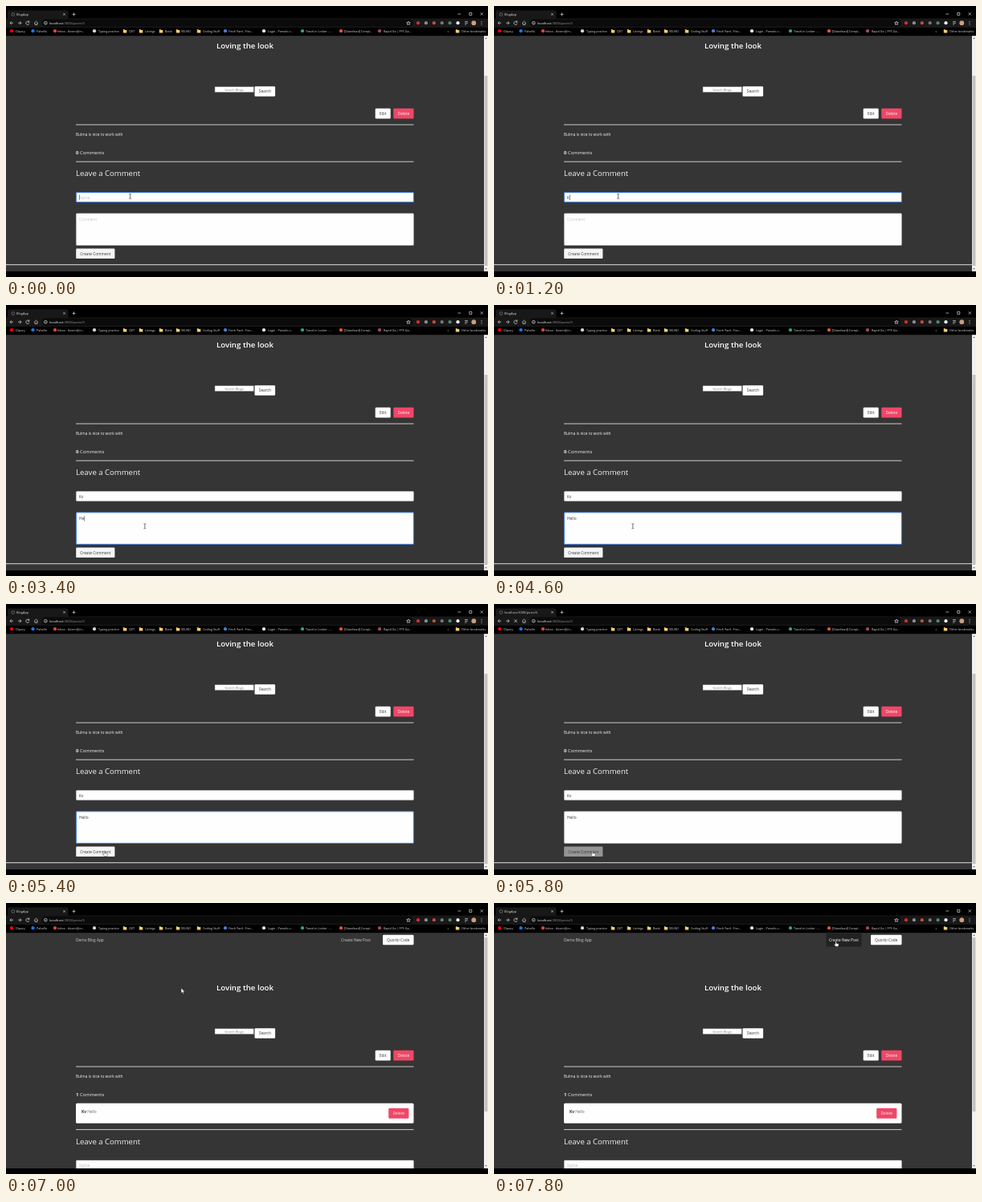
An HTML page that plays this animation: 600 by 338 pixels, repeating every 8 s.

```html
<!DOCTYPE html>
<html lang="en">
<head>
<meta charset="utf-8">
<title>Blog comment</title>
<style>
html, body { margin: 0; width: 100%; height: 100%; overflow: hidden; background: #000; }
svg { display: block; width: 100vw; height: 100vh; }
text { font: 4.8px "Open Sans", "Noto Sans", sans-serif; fill: #363636; white-space: pre; }
.mid { text-anchor: middle; }
.light { fill: #f2f2f2; }
.nav { fill: #cfcfcf; }
.hint { fill: #c4c4c4; }
.title { font-size: 9.7px; font-weight: 600; fill: #fff; }
.subtitle { font-size: 9.55px; fill: #f2f2f2; }
.count { font-size: 5.95px; fill: #f2f2f2; }
.bold { font-weight: 700; }
.small { font-size: 4px; fill: #858585; }
.chrome text { font-size: 3.7px; fill: #d8d8d8; }
.chrome .url { font-size: 4.15px; fill: #999; }
.chrome .tab { font-size: 3.9px; }
.rule { fill: #dcdcdc; }
.field { fill: #fefefe; stroke: #dbdbdb; stroke-width: .4; }
.focus { fill: none; stroke: #3273dc; stroke-width: .9; }
.pink { fill: #f14668; }
.icon { fill: none; stroke: #ddd; stroke-width: .7; }
.caret { fill: #222; }
</style>
</head>
<body>
<svg viewBox="0 0 600 338" preserveAspectRatio="none">
  <rect width="600" height="338" fill="#000"/>
  <rect y="37" width="600" height="294" fill="#353535"/>

  <g id="post">
    <text class="nav" x="87" y="47.8">Demo Blog App</text>
    <rect data-on="7800-8000" x="413.5" y="38" width="44" height="16.5" fill="#222"/>
    <text id="newPost" class="nav" x="417" y="47.8">Create New Post</text>
    <rect x="469" y="39.7" width="38.5" height="12.6" rx="1.2" fill="#fefefe"/>
    <text class="mid" x="488.2" y="47.8">Quorbi Code</text>
    <text class="title mid" x="297.5" y="109.4">Loving the look</text>
    <rect x="260" y="156.8" width="48.3" height="6.8" fill="#fff" stroke="#777" stroke-width=".5"/>
    <text class="small mid" x="284" y="161.7">Search Blogs</text>
    <rect x="309.5" y="156.3" width="25.6" height="12.5" rx="1.2" fill="#fefefe"/>
    <text class="mid" x="322.3" y="164.3">Search</text>
    <rect x="459.7" y="183.8" width="19" height="12.6" rx="1.2" fill="#fefefe"/>
    <text class="mid" x="469.2" y="191.8">Edit</text>
    <rect class="pink" x="482.3" y="183.8" width="25.2" height="12.6" rx="1.2"/>
    <text class="light mid" x="494.9" y="191.8">Delete</text>
    <rect class="rule" x="87" y="203.6" width="420.5" height=".9"/>
    <text class="light" x="87" y="217.7">Bulma is nice to work with</text>
    <text class="count" x="87" y="241.2"><tspan id="count" class="bold">0</tspan> Comments</text>
    <g data-on="6000-8000">
      <rect x="87" y="249.8" width="420.5" height="25" rx="1.5" fill="#fefefe"/>
      <text x="94" y="261.8"><tspan class="bold">Kv</tspan><tspan fill="#666"> Hello</tspan></text>
      <rect class="pink" x="476.2" y="256.1" width="25.2" height="12.6" rx="1.2"/>
      <text class="light mid" x="488.8" y="264.1">Delete</text>
    </g>
  </g>

  <g id="form">
    <rect class="rule" x="87" y="193.7" width="420.5" height=".9"/>
    <text class="subtitle" x="87" y="212.4">Leave a Comment</text>
    <rect class="field" x="87.4" y="232.5" width="420" height="12.1" rx="1"/>
    <rect class="focus" data-on="0-2600" x="87.4" y="232.5" width="420" height="12.1" rx="1"/>
    <text class="hint" data-on="0-1200 6000-8000" x="91" y="240.6">Name</text>
    <text id="name" x="91" y="240.6"></text>
    <rect class="caret" data-on="0-600 800-1200" x="91.2" y="235.4" width=".5" height="6.5"/>
    <rect class="caret" data-on="1200-1600" x="94.3" y="235.4" width=".5" height="6.5"/>
    <rect class="field" x="87.4" y="258.8" width="420" height="39.6" rx="1"/>
    <rect class="focus" data-on="2600-5600" x="87.4" y="258.8" width="420" height="39.6" rx="1"/>
    <text class="hint" data-on="0-3400 6000-8000" x="91" y="268">Comment</text>
    <text id="comment" x="91" y="268"></text>
    <rect id="commentCaret" class="caret" data-on="2600-3000 3400-4600" y="263" width=".5" height="6.5"/>
    <g id="submit">
      <rect x="87.2" y="302.5" width="48.2" height="12.6" rx="1.2" fill="#f5f5f5"/>
      <text class="mid" x="111.3" y="310.6">Create Comment</text>
    </g>
    <rect class="rule" y="322.2" width="595" height="1"/>
  </g>

  <rect x="595" y="37" width="5" height="294" fill="#f1f1f1"/>
  <rect id="thumb" x="595.6" width="3.8" fill="#c1c1c1"/>
  <path d="M596.3 41l1.2-1.6 1.2 1.6zM596.3 327l1.2 1.6 1.2-1.6z" fill="#555"/>
  <rect y="331" width="600" height="7" fill="#000"/>

  <g class="chrome">
    <rect width="600" height="37.2" fill="#000"/>
    <path d="M2 15.5V7.5q0-2 2-2H75.5q2 0 2 2V15.5H600V27H0V15.5z" fill="#181818"/>
    <rect x="44.5" y="16.6" width="462" height="9.2" rx="4.6" fill="#0b0b0b"/>
    <circle cx="8.8" cy="10.5" r="1.9" class="icon" stroke-opacity=".5"/>
    <text class="tab" x="13" y="11.8" id="tab"></text>
    <path class="icon" d="M71.3 9.2l2.4 2.4m0-2.4l-2.4 2.4M82.5 10.4h4m-2-2v4"/>
    <path class="icon" d="M562.5 10h3.6M576.8 8.4h3v3h-3zM590.7 8.3l3.2 3.2m0-3.2l-3.2 3.2"/>
    <path class="icon" d="M9 21.2H5m2-2l-2 2 2 2M15 21.2h4m-2-2l2 2-2 2"/>
    <path class="icon" data-on="0-5800 6000-8000" d="M28.7 20.1a2.1 2.1 0 1 0 .2 1.8M28.9 18.5v1.8h-1.8"/>
    <path class="icon" data-on="5800-6000" d="M25.2 19.4l3.6 3.6m0-3.6l-3.6 3.6"/>
    <path class="icon" d="M35.2 21.2l2.3-2.1 2.3 2.1M36 21v2.3h3V21"/>
    <circle class="icon" cx="49.3" cy="21.2" r="1.9"/>
    <path class="icon" d="M49.3 20.8v1.4"/>
    <text class="url" x="54" y="22.7"><tspan fill="#eee">localhost</tspan>:3000/posts/5</text>
    <path class="icon" d="M501 19l.7 1.5 1.6.2-1.2 1.1.3 1.6-1.4-.8-1.4.8.3-1.6-1.2-1.1 1.6-.2z"/>
    <g id="extensions"></g>
    <path class="icon" d="M571.2 19.5h3.6m-3.6 1.8h3.6m-3.6 1.8h2"/>
    <path d="M592 19v.9m0 1v.9m0 1v.9" stroke="#ddd" stroke-width=".9"/>
    <g id="bookmarks"></g>
    <text x="549.5" y="32.5">»</text>
  </g>

  <g id="pointer">
    <path data-shape="beam" d="M-1.4-3h1.1l.3.3.3-.3h1.1M0-2.7v5.4M-1.4 3h1.1l.3-.3.3.3h1.1" fill="none" stroke="#222" stroke-width=".6"/>
    <path data-shape="arrow" d="M0 0v6.5l1.5-1.4 1 2.3 1-.4-1-2.2h2.1z" fill="#fff" stroke="#111" stroke-width=".4"/>
    <path data-shape="hand" d="M-.4-2.6q.7-.8 1.2 0v2.4l2.4.5q.8.3.6 1.2l-.5 2.2H0L-1.9 1.2q0-.9.9-.5l.6.5z" fill="#fff" stroke="#111" stroke-width=".4"/>
    <g data-shape="blocked">
      <circle r="2.5" fill="#d9273a" stroke="#fff" stroke-width=".5"/>
      <path d="M-1.3-1l2.6 2" stroke="#fff" stroke-width="1"/>
    </g>
  </g>
</svg>
<script>
const LOOP = 8000, SUBMITTED = 6000;
const $ = id => document.getElementById(id);

function add(parent, tag, attrs, text = '') {
  const el = document.createElementNS('http://www.w3.org/2000/svg', tag);
  for (const key in attrs) el.setAttribute(key, attrs[key]);
  el.textContent = text;
  parent.append(el);
}

// [icon x, text x, label, icon colour]; no colour means a folder
const bookmarks = [
  [7, 11.7, 'Clipory', '#f00'], [33.5, 38, 'Palvello', '#1877f2'],
  [61, 64, 'Inbox - tkvorn@m...', '#d64a3c'], [110, 115, 'Typing practice', '#d5d5d5'],
  [148, 153, 'QVT'], [168, 173, 'Listings'], [193, 198, 'Bank'], [214, 218, 'VELNO'],
  [240, 245, 'Coding Stuff'], [273, 277, 'Finch Yard - Finc...', '#4a7fd0'],
  [321, 326, 'Login - Parvolo.c...', '#e6e6e6'], [369, 373, 'Travel-in Locker - ...', '#35a56a'],
  [417, 421, '[Download] Compl...', '#e2553d'], [465, 470, 'Rapid Go | FPS Ga...', '#a8485c'],
  [562, 567, 'Other bookmarks']
];
for (const [x, textX, label, color] of bookmarks) {
  if (color) add($('bookmarks'), 'circle', { cx: x, cy: 31.2, r: 2.1, fill: color });
  else add($('bookmarks'), 'path', { d: `M${x - 2.2} 29.3h1.7l.6.7h2.2v3.4h-4.5z`, fill: '#f4d06a' });
  add($('bookmarks'), 'text', { x: textX, y: 32.5 }, label);
}
['#d92b2b', '#8d8d8d', '#c84b3a', '#777', '#4c8a68', '#eee', '', '#c99c84'].forEach((fill, i) => {
  if (fill) add($('extensions'), 'circle', { cx: 513 + i * 9.9, cy: 21.2, r: i === 7 ? 2.9 : 2.1, fill });
});

// [start, x, y, shape]
const pointerSteps = [
  [0, 154.5, 237.3, 'beam'],
  [2000, 159, 250, 'beam'], [2200, 170, 269, 'beam'], [2400, 172.8, 275.8, 'beam'],
  [4800, 167, 281, 'beam'], [5000, 150, 293, 'beam'], [5200, 131, 305, 'hand'], [5400, 122.5, 311, 'hand'],
  [6000, 121.3, 308.3, 'blocked'],
  [6400, 123, 300, 'arrow'], [6600, 141, 252, 'arrow'], [6800, 178, 180, 'arrow'],
  [7000, 218, 106, 'arrow'], [7200, 255, 54, 'arrow'], [7400, 269, 32, 'arrow'],
  [7600, 352, 39, 'arrow'], [7800, 425.3, 50.5, 'hand']
];

const timed = [...document.querySelectorAll('[data-on]')].map(el => ({
  el, spans: el.dataset.on.split(' ').map(span => span.split('-').map(Number))
}));
const shapes = [...document.querySelectorAll('[data-shape]')];
const show = (el, on) => el.setAttribute('visibility', on ? 'visible' : 'hidden');
const move = (el, x, y) => el.setAttribute('transform', `translate(${x} ${y})`);

function setText(el, text) {
  if (el.textContent !== text) el.textContent = text;
}

function draw(t) {
  const done = t >= SUBMITTED;
  const loading = t >= 5800 && !done;
  for (const { el, spans } of timed) show(el, spans.some(([from, to]) => t >= from && t < to));

  move($('post'), 0, done ? 0 : -56);
  move($('form'), 0, done ? 88.5 : 0);
  $('thumb').setAttribute('y', done ? 43 : 87);
  $('thumb').setAttribute('height', done ? 217 : 237);

  const nameLength = done || t < 1200 ? 0 : t < 1600 ? 1 : 2;
  const commentLength = done || t < 3400 ? 0 : Math.min(5, 2 + Math.floor((t - 3400) / 200));
  setText($('name'), 'Kv'.slice(0, nameLength));
  setText($('comment'), 'Hello'.slice(0, commentLength));
  $('commentCaret').setAttribute('x', 91.2 + (commentLength ? $('comment').getComputedTextLength() : 0));

  setText($('count'), done ? '1' : '0');
  setText($('tab'), loading ? 'localhost:3000/posts/5' : 'BlogApp');
  $('submit').setAttribute('opacity', loading ? .5 : 1);
  $('newPost').style.fill = t >= 7800 ? '#fff' : '';

  const [, x, y, shape] = pointerSteps.findLast(step => t >= step[0]);
  move($('pointer'), x, y);
  shapes.forEach(el => show(el, el.dataset.shape === shape));
}

const start = performance.now();
function tick() {
  draw((performance.now() - start) % LOOP);
  requestAnimationFrame(tick);
}
tick();
</script>
</body>
</html>
```
